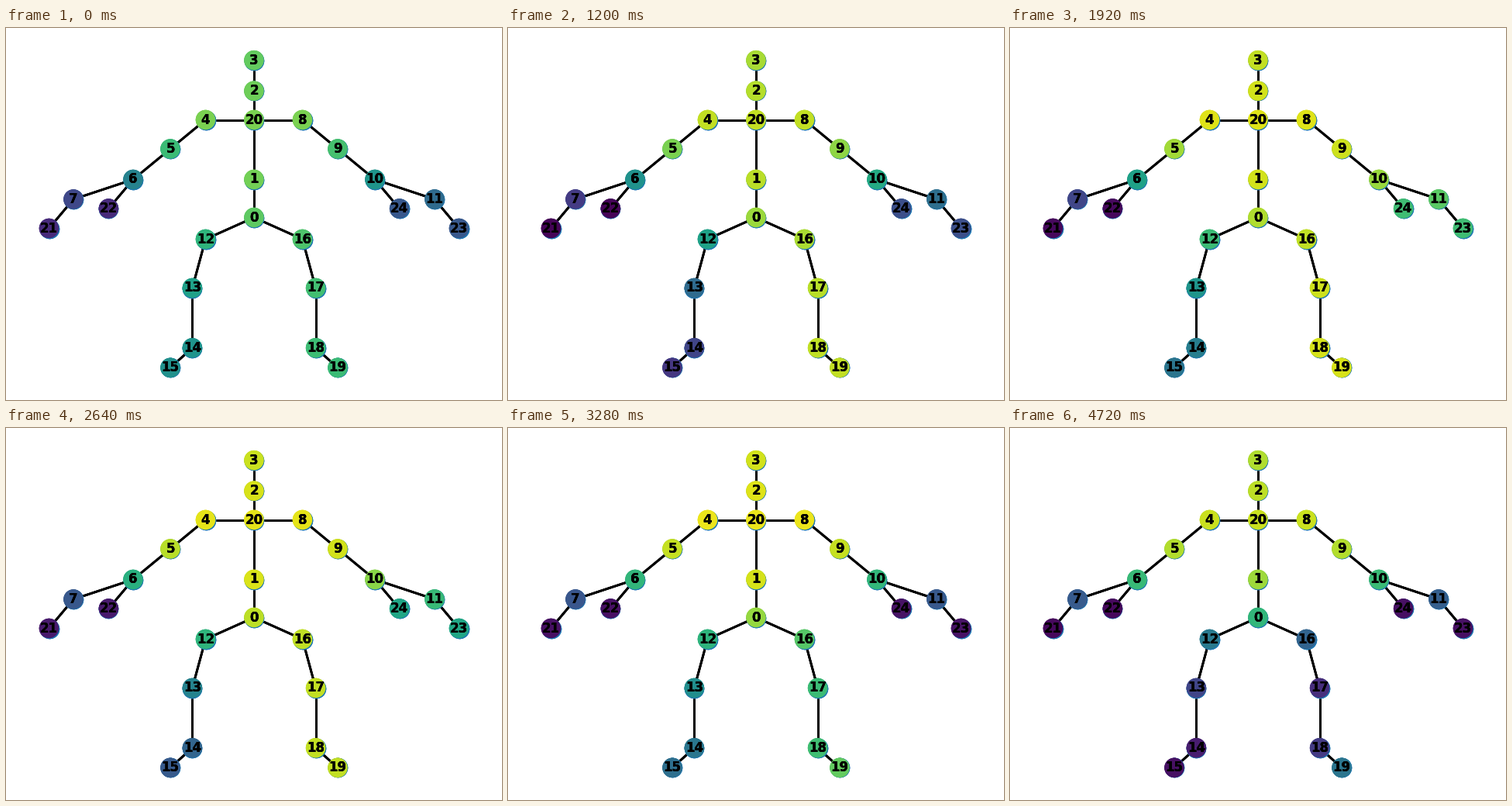
Write a matplotlib script that moves like this. It is 640x480 px and loops after 4.8 s.

```python
import numpy as np
import matplotlib.pyplot as plt
from matplotlib.animation import FuncAnimation
from matplotlib.collections import LineCollection

W, H = 640, 480
FRAMES, INTERVAL = 60, 80
JOINTS = 25
LAYERS = 3  # repeated drawing hardens the antialiased edges

# joint: (distance from the body axis, y); the right side mirrors the left
SPINE = {3: 41.65, 2: 81.2, 20: 118.5, 1: 195.5, 0: 244.5}
LEFT = {4: (62.5, 118.5), 5: (108, 156), 6: (156, 195.5), 7: (233, 221),
        21: (264.5, 258.5), 22: (187.6, 233), 12: (62.5, 272.5),
        13: (79.6, 335.5), 14: (79.6, 412.8), 15: (108, 438.35)}

BACK, NECK = (20, 1, 0), (20, 2, 3)
LEFT_ARM, RIGHT_ARM = (4, 5, 6, 7, 21), (8, 9, 10, 11, 23)
LEFT_LEG, RIGHT_LEG = (0, 12, 13, 14, 15), (0, 16, 17, 18, 19)
CHAINS = [NECK, BACK, (20,) + LEFT_ARM, (20,) + RIGHT_ARM,
          LEFT_LEG, RIGHT_LEG, (6, 22), (10, 24)]

# Activation at the ends of the limbs, as a fraction of the colour map
KEYS = [0, 4, 15, 24, 33, 41, 59]
ENDS = {
    "chest": [.80, .98, .91, .95, .96, .97, .92],
    "hip": [.75, .93, .85, .88, .90, .84, .66],
    "left hand": [.12, .03, .01, .02, .07, .04, .02],
    "right hand": [.27, .28, .24, .69, .59, .05, .04],
    "left foot": [.50, .55, .16, .39, .28, .36, .04],
    "right foot": [.68, .88, .91, .94, .91, .76, .39],
}


def joint_positions():
    pos = {j: (W / 2, y) for j, y in SPINE.items()}
    for j, (dx, y) in LEFT.items():
        pos[j] = (W / 2 - dx, y)
        pos[j + (4 if j < 20 else 2)] = (W / 2 + dx, y)
    return np.array([pos[j] for j in range(JOINTS)])


def spread(values, limb, start, end, bend, dip=0):
    """Ease the activation along a limb, lowered by dip in its middle."""
    u = np.linspace(0, 1, len(limb))
    s = u ** bend
    ease = s * s * (3 - 2 * s)
    values[list(limb)] = start + (end - start) * ease - dip * np.sin(np.pi * u)


def activation(frame):
    end = {k: np.interp(frame, KEYS, track) for k, track in ENDS.items()}
    chest, hip = end["chest"], end["hip"]
    arm_bend = 0.95 + 0.6 * frame / FRAMES
    knee_dip = np.interp(frame, [33, FRAMES - 1], [0, 0.33])

    v = np.zeros(JOINTS)
    spread(v, NECK, chest, chest - 0.04, 1)
    spread(v, BACK, chest, hip, 1.6)
    spread(v, LEFT_ARM, chest, end["left hand"], arm_bend)
    spread(v, RIGHT_ARM, chest, end["right hand"], arm_bend)
    spread(v, LEFT_LEG, hip, end["left foot"], 0.6)
    spread(v, RIGHT_LEG, hip, end["right foot"], 0.6, knee_dip)
    v[22], v[24] = v[21], v[23]
    return v


fig = plt.figure(figsize=(W / 100, H / 100), dpi=100, facecolor="white")
ax = fig.add_axes([0, 0, 1, 1])
ax.set_axis_off()

points = joint_positions()
bones = [(points[a], points[b]) for c in CHAINS for a, b in zip(c, c[1:])]
ax.add_collection(LineCollection(bones * LAYERS, colors="black",
                                 linewidths=2, zorder=1))

nodes = []
for _ in range(LAYERS):
    ax.scatter(*points.T, s=300, c="#1f78b4", zorder=2)
    nodes.append(ax.scatter(*points.T, s=300, c=activation(0), cmap="viridis",
                            vmin=0, vmax=1, zorder=2))
    for j, (x, y) in enumerate(points):
        ax.text(x, y, str(j), size=12, family="DejaVu Sans", weight="bold",
                color="black", ha="center", va="center", zorder=3)

ax.set_xlim(0, W)
ax.set_ylim(H, 0)


def update(frame):
    values = activation(frame)
    for layer in nodes:
        layer.set_array(values)
    return nodes


anim = FuncAnimation(fig, update, frames=FRAMES, interval=INTERVAL,
                     repeat=True, repeat_delay=0, blit=False)
plt.show()
```
